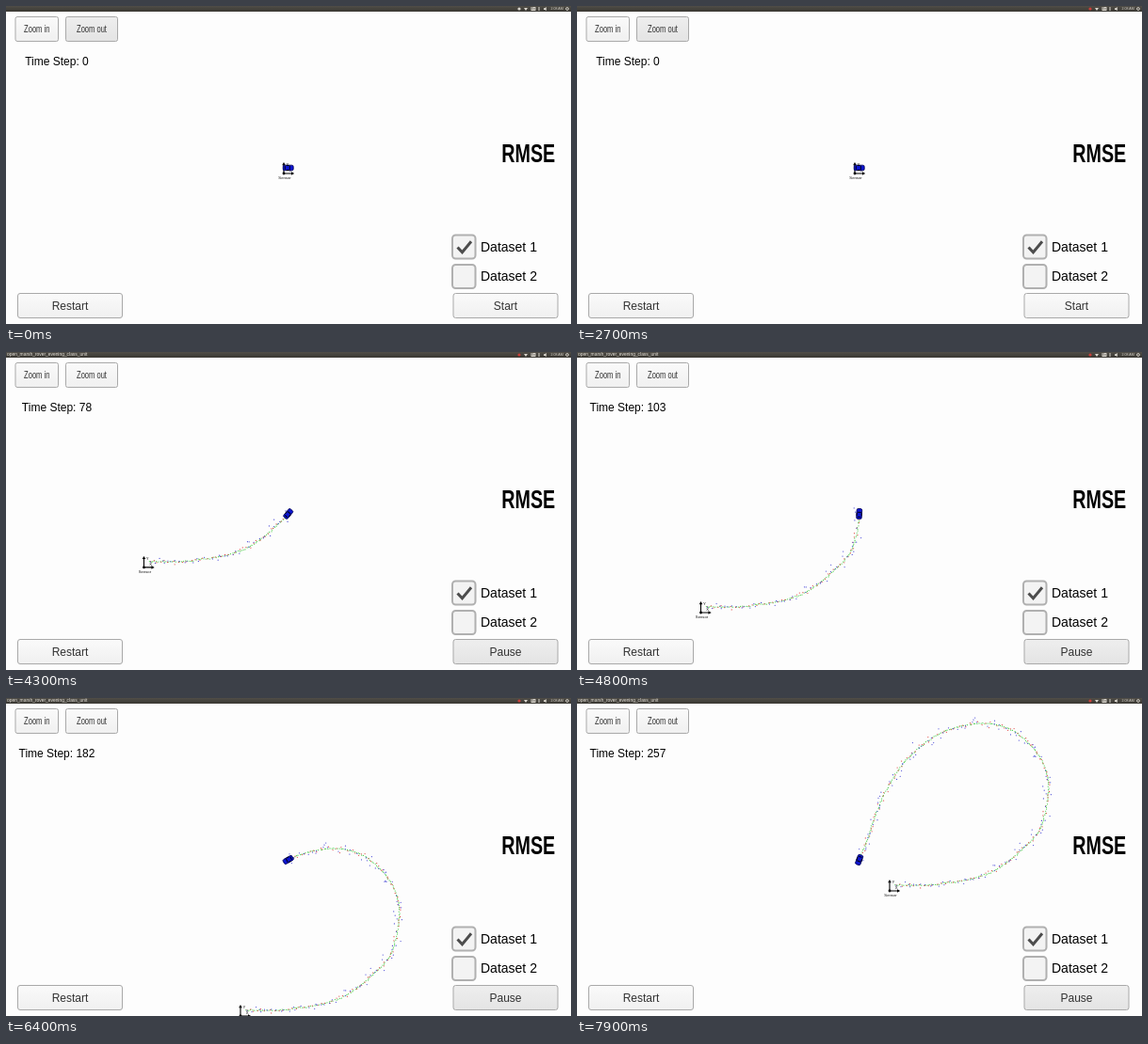
Write an HTML page that moves like this. It is 600 px wide and 338 px high and loops after 8 s.

```html
<!DOCTYPE html>
<html lang="en">
<head>
<meta charset="utf-8">
<title>Tracking simulator</title>
<style>
  html, body { margin: 0; width: 100%; height: 100%; overflow: hidden; background: #fdfdfd; }
  svg { display: block; width: 600px; height: 338px; }
  text { font-family: "Liberation Sans", Arial, sans-serif; }
  .mid { text-anchor: middle; }
  .btn { stroke: #a9a9a9; stroke-width: 1; }
  .label { font-size: 12px; fill: #323232; }
  .box { fill: #f3f3f3; stroke: #b0b0b0; stroke-width: 2; }
  .dots { fill: none; stroke-linecap: round; stroke-width: 1.25; }
</style>
</head>
<body>
<svg viewBox="0 0 600 338">
  <defs>
    <linearGradient id="barFill" x2="0" y2="1">
      <stop offset="0" stop-color="#504d47"/>
      <stop offset="1" stop-color="#3a3833"/>
    </linearGradient>
    <linearGradient id="light" x2="0" y2="1">
      <stop offset="0" stop-color="#fafafa"/>
      <stop offset="1" stop-color="#f0f0f0"/>
    </linearGradient>
    <linearGradient id="shade" x2="0" y2="1">
      <stop offset="0" stop-color="#eeeeee"/>
      <stop offset="1" stop-color="#e4e4e4"/>
    </linearGradient>
  </defs>
  <rect width="600" height="338" fill="#fdfdfd"/>

  <g id="world">
    <path id="green" class="dots" stroke="#4fd04f"/>
    <path id="red" class="dots" stroke="#e0504c"/>
    <path id="blue" class="dots" stroke="#5252d8"/>
    <g stroke="#000" fill="#000">
      <path d="M0 -9V0H8.5" fill="none" stroke-width="1.1"/>
      <path d="M0 -12l-1.8 3.2h3.6zM11.2 0l-3.2 -1.8v3.6z" stroke="none"/>
      <circle r="1.4" stroke="none"/>
    </g>
    <g font-size="4.2" class="mid" fill="#111">
      <text x="3.8" y="-7.6">Y</text>
      <text x="7.2" y="-2">X</text>
      <text x="1" y="6">Sensor</text>
    </g>
  </g>

  <g id="car">
    <rect x="-5.5" y="-2.8" width="11" height="5.6" rx="1.6" fill="#0c14d0" stroke="#000050" stroke-width=".8"/>
    <path d="M1.6 -2v4M-3.4 -1.8v3.6M-2 -2.5h3M-2 2.5h3" stroke="#000018" stroke-width="1"/>
  </g>

  <rect width="600" height="6" fill="url(#barFill)"/>
  <text id="title" x="1" y="4.3" font-size="4.9" fill="#e4e0d8">open_marsh_rover_evening_class_unit</text>
  <g fill="#d8d4cc">
    <circle id="mic" cx="545" cy="3" r="1.6"/>
    <path d="M550 2h4l-2 3zM565.5 1h1v4h-1zM571 2.3h1.2l1.6 -1.2v4l-1.6 -1.2h-1.2z"/>
    <rect x="557.5" y="1" width="5" height="4" rx=".5"/>
    <text x="578.5" y="4.4" font-size="3.6">2:08 AM</text>
    <circle cx="596" cy="3" r="1.4" fill="none" stroke="#d8d4cc" stroke-width=".9"/>
  </g>
  <text x="560" y="4.2" font-size="3.2" class="mid" fill="#3a3833">En</text>

  <rect class="btn" x="10" y="11.5" width="45.5" height="26" rx="2" fill="url(#light)"/>
  <rect id="zoomOut" class="btn" x="63.5" y="11.5" width="55" height="26" rx="2"/>
  <g font-size="10.8" fill="#323232" class="mid">
    <text transform="translate(32.7 28.3) scale(.7 1)">Zoom in</text>
    <text transform="translate(91 28.3) scale(.7 1)">Zoom out</text>
  </g>
  <text id="step" class="mid" x="54" y="63.3" font-size="12"></text>
  <text class="mid" transform="translate(554.8 166) scale(.73 1)" font-size="27" font-weight="bold">RMSE</text>

  <rect class="box" x="474" y="243.5" width="24.5" height="25" rx="3.5"/>
  <rect class="box" x="474" y="275" width="24.5" height="25" rx="3.5"/>
  <path d="M479.5 256.5l5 5.3l9.5 -11.5" fill="none" stroke="#4c4c4c" stroke-width="3"/>
  <text x="504" y="260.8" font-size="14">Dataset 1</text>
  <text x="504" y="292.3" font-size="14">Dataset 2</text>

  <rect class="btn" x="12.5" y="305.5" width="111" height="26" rx="2.5" fill="url(#light)"/>
  <text class="label mid" x="68" y="322.7">Restart</text>
  <rect id="run" class="btn" x="475" y="305.5" width="111" height="26" rx="2.5"/>
  <text id="runText" class="label mid" x="530.5" y="322.7"></text>
</svg>
<script>
const LOOP = 8000, FRAME = 100, LAST = 260;
const CAR = [300, 172];
const $ = id => document.getElementById(id);

// Car route around the sensor: step, x, y
const route = [
  [0, 5, -6], [24, 55, -7.5], [48, 106, -19], [72, 145, -48], [85, 161, -69],
  [103, 168.5, -105], [116, 165, -131], [129, 150, -154], [143, 127, -172],
  [158, 97, -178], [174, 65, -172], [182, 51, -166], [191, 35, -155],
  [205, 15, -136], [215, 3, -118], [222, -5, -104], [232, -14, -83],
  [246, -23.5, -55], [257, -32, -33], [268, -40, -10]
];

function slope(i, k) {
  const a = route[Math.max(i - 1, 0)], b = route[Math.min(i + 1, route.length - 1)];
  return (b[k] - a[k]) / (b[0] - a[0]);
}

// Cubic Hermite through the route
function place(step) {
  let i = 0;
  while (i < route.length - 2 && route[i + 1][0] <= step) i++;
  const a = route[i], b = route[i + 1], h = b[0] - a[0];
  const u = (step - a[0]) / h, v = 1 - u;
  return [1, 2].map(k =>
    v * v * (1 + 2 * u) * a[k] + u * u * (3 - 2 * u) * b[k] +
    h * u * v * (v * slope(i, k) - u * slope(i + 1, k)));
}

let seed = 77;
function rand() {
  seed = (seed * 16807) % 2147483647;
  return seed / 2147483647;
}
const gauss = () => Math.sqrt(-2 * Math.log(rand())) * Math.cos(2 * Math.PI * rand());
const dot = (x, y) => `M${x.toFixed(1)} ${y.toFixed(1)}h.01`;

// Lidar (red) errs in x and y; radar (blue) errs in range and bearing
const trail = { green: [], red: [], blue: [] };
for (let s = 0; s < LAST; s++) {
  const [x, y] = place(s);
  trail.green.push(dot(x + gauss() * .35, y + gauss() * .35));
  if (s % 2) {
    const r = Math.hypot(x, y) + gauss() * 2.4, a = Math.atan2(y, x) + gauss() * .027;
    trail.blue.push(dot(r * Math.cos(a), r * Math.sin(a)));
  } else {
    trail.red.push(dot(x + gauss() * 1.2, y + gauss() * 1.2));
  }
}

function render(time) {
  const t = Math.floor(time / FRAME) * FRAME;
  const on = t >= 2800;
  const step = on ? Math.round(48 + (t - 3700) * .0497) : 0;
  const [x, y] = place(step), [nx, ny] = place(step + 1), [px, py] = place(Math.max(step - 1, 0));
  const angle = on ? Math.atan2(ny - py, nx - px) * 180 / Math.PI : 0;

  $("world").setAttribute("transform", `translate(${CAR[0] - x} ${CAR[1] - y})`);
  $("car").setAttribute("transform", `translate(${CAR[0] - .3} ${CAR[1]}) rotate(${angle})`);
  $("green").setAttribute("d", trail.green.slice(0, step).join(""));
  $("red").setAttribute("d", trail.red.slice(0, Math.ceil(step / 2)).join(""));
  $("blue").setAttribute("d", trail.blue.slice(0, Math.floor(step / 2)).join(""));
  $("step").textContent = "Time Step: " + step;
  $("runText").textContent = on ? "Pause" : "Start";
  $("run").setAttribute("fill", on ? "url(#shade)" : "url(#light)");
  $("zoomOut").setAttribute("fill", on ? "url(#light)" : "url(#shade)");
  $("title").setAttribute("visibility", on ? "visible" : "hidden");
  $("mic").setAttribute("fill", t >= 100 ? "#c8403a" : "#d8d4cc");
}

function tick() {
  render(performance.now() % LOOP);
  requestAnimationFrame(tick);
}
tick();
</script>
</body>
</html>
```
